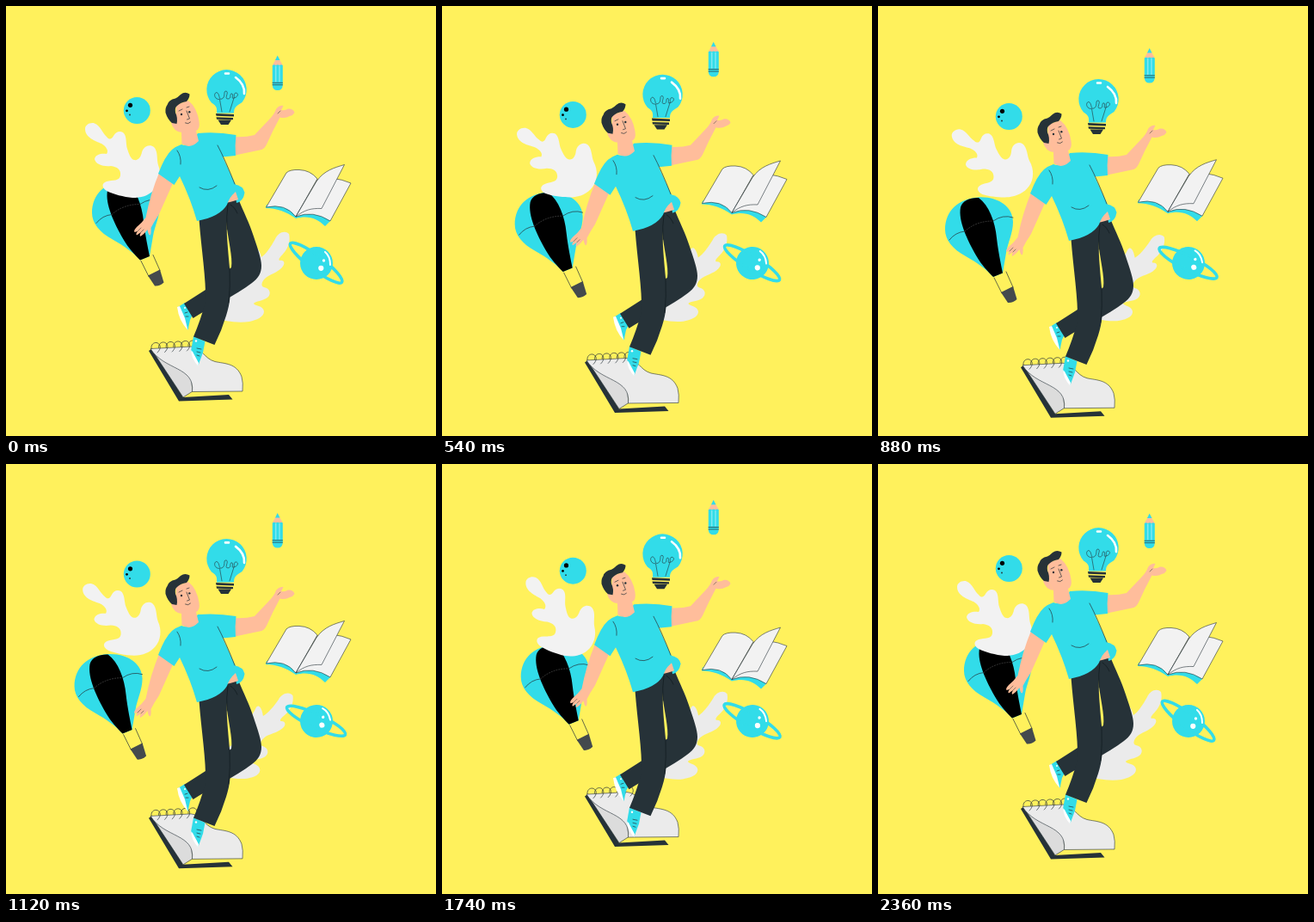
An HTML page that plays this animation: 500 px wide and 500 px high, repeating every 2380 ms.

```html
<!DOCTYPE html>
<html lang="en">
<head>
<meta charset="utf-8">
<title>Floating ideas</title>
<style>
  html, body { margin: 0; width: 100%; height: 100%; overflow: hidden; background: #fff15c; }
  svg { display: block; width: 100%; height: 100%; }
  .cyan { fill: #32dce9; }
  .dark { fill: #263238; }
  .skin { fill: #ffbd9b; }
  .page { fill: #f2f2f2; }
  .white { fill: #fff; }
  .line { fill: none; stroke: #263238; stroke-width: .7; stroke-linecap: round; stroke-linejoin: round; }
  .shine { fill: none; stroke: #fff; stroke-width: 2; stroke-linecap: round; }
  .edge { stroke: #263238; stroke-width: .6; stroke-linejoin: round; }
</style>
</head>
<body>
<svg viewBox="0 0 500 500">
  <g id="balloon">
    <path class="cyan" d="M78 260C78 238 94 224 116 222.500C140 221 157 234 157 251C157 264 151 275 149 287L145 310.500L134 315C126 306 116 299 102 291C87 283 78 272 78 260Z"/>
    <path d="M96 234C98 226 108 222.500 117 223C129 232 136 250 138 270C140 287 143 300 145 310.500L134 315C128 309 121 302 114 290C104 272 93 250 96 234Z"/>
    <path class="line" d="M83 272Q90 263 101 262M134 250Q145 242 157 246"/>
    <path class="line" style="stroke:#555;stroke-dasharray:1 2" d="M101 262Q114 250 134 250"/>
    <path class="line" d="M135 316L144 334M149 309L157 327"/>
    <path d="M143 333L157 326L161.500 341Q157 345.500 151 345Z" fill="#444a4d"/>
  </g>

  <path id="leafLeft" class="page" d="M92 143C92 138 98 135 103 136.500C110 139 112 148 117 152C120 156 123 155 125 151C128 146 132 145 136 147C141 151 139 160 141 166C143 172 145 178 149 179C154 180 157 175 158 170C160 163 167 160 172 164C177 169 175 178 177 185C181 195 179 207 172 214C165 221 157 223 147 223C137 222 125 219 117 215C111 211 111 206 117 204C124 202 132 204 133 197C134 190 129 187 122 186C113 187 104 184 103 178C104 172 112 171 117 172C120 168 116 163 111 160C104 157 92 153 92 143Z"/>

  <path id="leafRight" fill="#ebebeb" d="M313 271C316 264 324 260 329 265C331 273 328 281 324 286C320 291 316 294 318 296C324 295 325 300 321 304C316 310 306 312 301 317C297 321 296 326 300 327C307 328 309 335 304 339C299 343 290 343 288 346C289 349 299 348 300 355C300 362 291 365 283 367C268 369 253 366 245 363C246 345 268 326 281 312C277 302 286 290 288 283C291 278 295 284 297 292C302 289 308 280 313 271Z"/>

  <g id="ball">
    <circle class="cyan" cx="152.300" cy="121.500" r="15.500"/>
    <circle cx="144.500" cy="115.300" r="2.600"/>
    <circle cx="140.500" cy="121.800" r="1.400"/>
    <circle class="dark" cx="144" cy="126.500" r=".9"/>
  </g>

  <g id="pencil">
    <path class="skin" d="M315.700 58L321.800 69H309.800Z"/>
    <path class="cyan" d="M315.700 57.500L318.500 63H313Z"/>
    <path class="cyan" d="M309.800 69Q312 67.500 313.800 69Q316 67.500 318 69Q320 67.500 321.800 69V92Q321.500 98 315.800 98Q310 98 309.800 92Z"/>
    <path class="line" style="stroke:#d5f8fa" d="M313.800 70V88M318 70V88"/>
    <path class="line" d="M310 89.300H321.500M310 91.700H321.500"/>
  </g>

  <g id="bulb">
    <path class="cyan" d="M245 124.500C246 117 243 115 239 112.500A23.200 23.200 0 1 1 274.500 112C268 116 265 118 265 124.500Z"/>
    <path class="line" style="stroke-width:.6" d="M251 123L248.500 108.500C242 109 241 101 245 100.500C249 102 247 110 251 108C256 106 252 98.500 256 99C260 100 253 108 258 108C263 108 259 101 263 102C265 105 261 108 265 107C270 106 271 101 267 101C264 102 266 106 265 107L260 123"/>
    <path class="shine" style="stroke-width:2.600" d="M267 83Q278 91 277 102M255 78.500H259"/>
    <path class="dark" d="M244 125L265 126V128.500L244.500 127.800ZM244.500 129.300L264 130V132.300L245 131.800ZM246.500 132.600H262L258.500 138H250Z"/>
  </g>

  <g id="book">
    <path class="cyan" d="M302 235C314 235 326 239 337 247C351 243 362 247 371 256L378 249L350 236L303 231Z"/>
    <path class="page edge" d="M302.500 234L326 194Q330 190 341 190.500Q354 191 362 201L337 245Q325 229 302.500 234Z"/>
    <path class="page edge" d="M337 245L362 202Q380 197 401 206L377 250Q357 237 337 245Z"/>
    <path class="page edge" d="M337 245L361 204C370 191 382 188 393.500 184.500L367 235.500C355 235 347 237 337 245Z"/>
  </g>

  <g id="planet">
    <circle class="cyan" cx="361" cy="299" r="19"/>
    <ellipse cx="360.500" cy="299" rx="37.500" ry="8" fill="none" stroke="#32dce9" stroke-width="3.600" transform="rotate(37 361 299)"/>
    <path class="shine" d="M371 286Q377 291 377 301"/>
    <circle class="white" cx="369.500" cy="296" r="1.700"/>
    <circle class="white" cx="366.300" cy="304.800" r="3.100"/>
  </g>

  <g id="notebook">
    <path class="dark" d="M166 401L170 398L206 455L259 452L263.500 457.500L201 459.500Z"/>
    <path fill="#dcdcdc" class="edge" d="M170 400.500L206 455L217 448L214 420Z"/>
    <path fill="#ebebeb" class="edge" d="M168 398.500L215 396C228 397 230 410 243 413.500C254 416 268 415 274 431Q276 438 275 448L216.500 448.500C220 419 184 424 168 398.500Z"/>
    <g id="rings" class="line"></g>
  </g>

  <g id="man">
    <!-- shoes -->
    <path class="cyan" d="M208 345L217 359L214 365L211.500 377L200 350Z"/>
    <path class="white" d="M199 350L202 349L208 363L211.500 377Q201 366 199 350Z"/>
    <path class="cyan" d="M218 384L231.500 390L229 403L223.500 418L215 401Z"/>
    <path class="white" d="M215 400L217 402L224 415L223.500 418.500Q216 411 215 400Z"/>
    <path class="line" d="M208 357L211 356M209 361L212 361M222 398L227 399M222 402L226 403M222 406L225 407"/>
    <circle class="white" cx="221" cy="389.500" r="1.200"/>
    <circle class="white" cx="208" cy="351" r="1"/>

    <!-- legs -->
    <path class="dark" d="M253 229L270 224C276 239 283 252 288 268C293 283 297 294 297 302C297 311 293 317 286 322C268 336 238 350 217.500 363L207 346L232 330L262 304C264 292 258 272 256 250Z"/>
    <path class="dark" d="M224.500 248L259 228C254 250 258 280 260.500 310C262 330 261 345 256 360Q251 377 242.500 394L218 384.500Q226 366 232 344C233 318 227 282 224.500 248Z"/>
    <path class="line" style="stroke:#111a1f" d="M260 305Q261 326 259 345M258 231Q256 244 257 260M261 231Q266 234 269 241"/>

    <!-- torso and arms -->
    <path class="cyan" d="M265 207Q276 209 277.500 217Q276 227 268 229Z"/>
    <path class="skin" d="M256 229L262 216L267 216L270 225Q265 227 256 229Z"/>
    <path class="skin" d="M178 194L194.500 205L178 242Q172 251 168.500 258Q169 265 167.500 266.500Q165.500 266 164.500 260Q160 266 156 268Q155 266 157 263L152 266.500Q150.500 265 153 262L149.500 263Q148 261 152 257Q158 252 162.500 246Q168 218 178 194Z"/>
    <path class="line" style="stroke-width:.5" d="M153 262L157 258M157 263L160 260"/>
    <path class="skin" d="M264 152Q278 153 289 150L306 132Q312 126 314 120Q318 115 322.500 116L320 121Q324 122 328 119.500Q334 119 335.500 124Q334 127 330 128Q325 131 318.500 129.500Q310 145 303 161Q300 167 295 167.500L264 174Z"/>
    <path class="line" style="stroke-width:.5" d="M319 122L316 125"/>
    <path class="cyan" d="M204 161Q214 166 223 148Q245 146 267.500 150Q266 162 267 174L252 175.500L267 208Q270 214 265 218Q260 222 257 231Q249 245 222 250Q215 225 202 198L195.500 208L177 195Q185 174 193 167Q198 163 204 161Z"/>
    <path class="line" d="M246 162Q255 179 266 207M225 211Q235 217 245 209M199 168Q204 175 203 184"/>

    <!-- head -->
    <path class="skin" d="M197 134L204 147L204.500 160Q214 167 224 157L221 145Q226 143 224.500 134Q222 118 212 110L198 115Z"/>
    <path class="skin" d="M192 136Q195 133 198 135L204 147Q195 146 192 136Z"/>
    <path class="dark" d="M185.500 124Q185 118 187.500 115Q189 109 197 107.500Q200 106 203 103Q208 99 213.500 102.500Q213.500 107 210 111Q203 112 199 116Q196 118 197 124Q200 130 198.500 137L193 136Q188 132 185.500 124Z"/>
    <path class="line" d="M210 122L213.500 131L210.500 132M208.500 136Q212 138 214.500 135M201 122L205 120M210 118L213 117"/>
    <circle class="dark" cx="204" cy="126" r="1.200"/>
    <circle class="dark" cx="213.300" cy="123.300" r="1.200"/>
  </g>
</svg>
<script>
const LOOP = 2380;
const part = id => document.getElementById(id);
const move = (id, x, y) => part(id).setAttribute('transform', `translate(${x} ${y})`);
const turn = (id, angle, x, y) => part(id).setAttribute('transform', `rotate(${angle} ${x} ${y})`);

// Cosine easing through [time, value] keys, starting and ending at 0.
function through(t, ...keys) {
  let from = [0, 0];
  for (const to of [...keys, [LOOP, 0]]) {
    if (t <= to[0]) {
      const p = (t - from[0]) / (to[0] - from[0]);
      return from[1] + (to[1] - from[1]) * (1 - Math.cos(Math.PI * p)) / 2;
    }
    from = to;
  }
}

let rings = '';
for (let i = 0; i < 6; i++) {
  const x = 171 + i * 8.6, y = 398 - i * .5;
  rings += `<path d="M${x - 2} ${y}c-1 -7 8 -9 10 -3c1 3 -1 6 -3 8"/>`;
}
part('rings').innerHTML = rings;

function draw(now) {
  const t = now % LOOP;
  const slow = through(t, [LOOP / 2, 1]);
  const early = through(t, [860, 1]);

  move('man', 0, 27.3 * slow);
  move('bulb', 0, 13 * slow);
  turn('planet', -12 * slow, 361, 299);
  turn('leafRight', 6 * slow, 289, 311);
  move('pencil', 0, -8 * (1 - Math.cos(4 * Math.PI * t / LOOP)));
  move('ball', 0, 7 * early);
  move('balloon', 22 * (1 - early), -19.5 * (1 - early));
  move('book', 0, through(t, [810, -6], [1610, 6]));
  turn('leafLeft', through(t, [810, -9], [1610, 7]), 145, 188);
  move('notebook', 0, through(t, [860, 19.3], [1650, -15]));
  requestAnimationFrame(draw);
}
requestAnimationFrame(draw);
</script>
</body>
</html>
```
